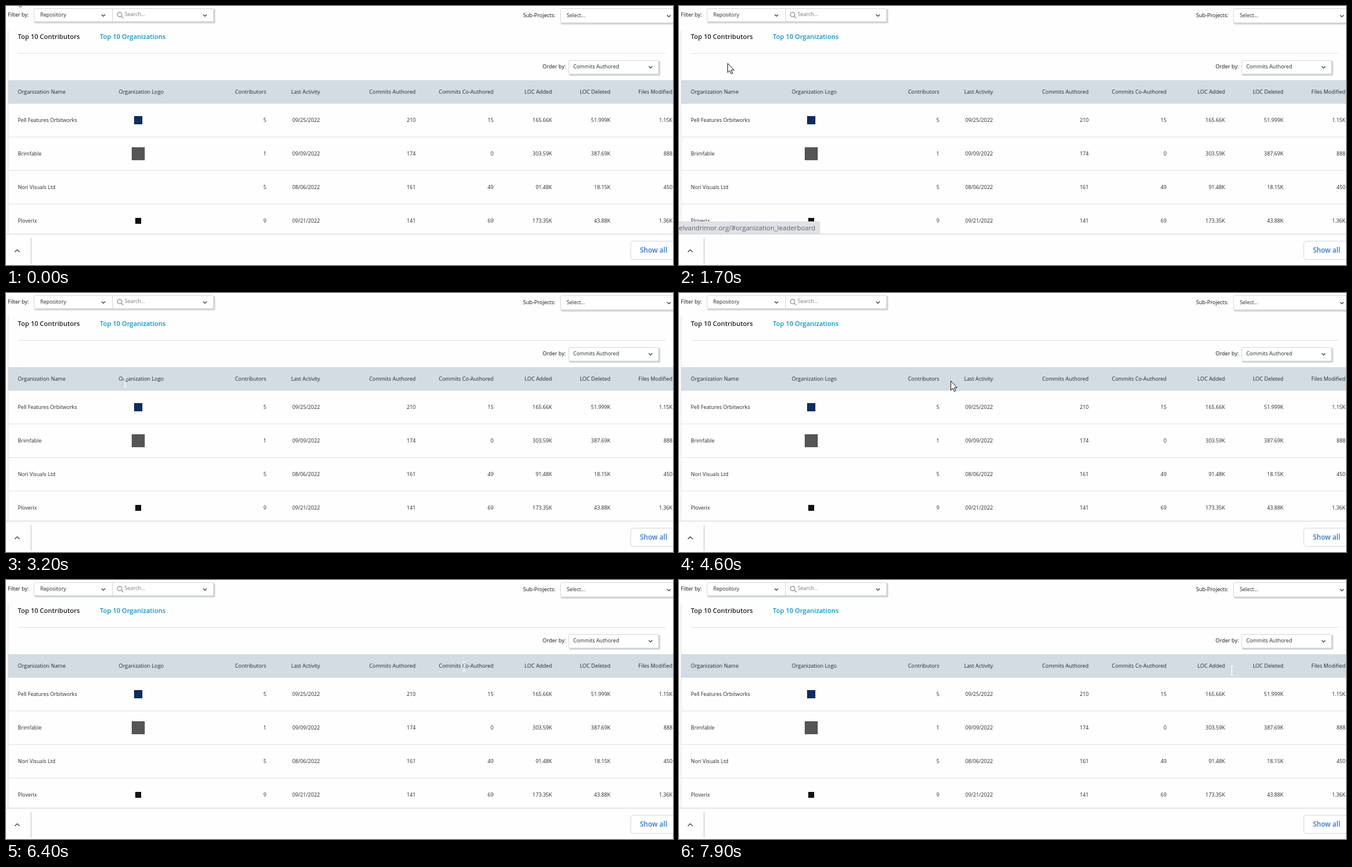
Animation of 1130 by 440 pixels, one loop 8000 ms. Source, as an HTML page:

```html
<!DOCTYPE html>
<html lang="en">
<head>
<meta charset="utf-8">
<title>Organization leaderboard</title>
<style>
html, body { margin: 0; width: 100%; height: 100%; overflow: hidden; background: #fefefe; }
svg { display: block; width: 100%; height: 100%; }
text { font: 8.8px "Open Sans", "Noto Sans", sans-serif; fill: #25282b; }
.label { font-size: 9px; fill: #111; }
.head { font-size: 8.95px; fill: #1d2a34; }
.tab { font-size: 11px; font-weight: 600; fill: #222; }
.active { fill: #0a94cb; }
.hint { fill: #777; }
.button { font-size: 11.6px; font-weight: 600; fill: #3273dc; }
.address { font-size: 11.25px; fill: #5c5f63; }
.chevron { fill: none; stroke: #333; stroke-width: 1.2; }
.box { fill: #fff; stroke: #d4d7da; }
.shadow { fill: #d2d5d8; }
</style>
</head>
<body>
<svg id="stage" viewBox="0 0 1130 440" xmlns="http://www.w3.org/2000/svg">
  <g id="page"></g>
  <g id="status">
    <rect y="366" width="239" height="21" fill="#dfe1e5"/>
    <text class="address" x="231" y="381" text-anchor="end">elvandrimor.org/#organization_leaderboard</text>
  </g>
  <path id="arrow" d="M.5 .5V16L4 12.7L6.4 18.3L8.8 17.3L6.5 11.8H11.3Z" fill="#fff" stroke="#111" stroke-linejoin="round"/>
  <path id="beam" d="M-3 -7.5H-.8L0 -6.8L.8 -7.5H3M0 -6.8V6.8M-3 7.5H-.8L0 6.8L.8 7.5H3" fill="none" stroke="#fff" stroke-width="1.2"/>
</svg>
<script>
const LOOP = 8000, STEP = 100;
const byId = id => document.getElementById(id);

const text = (x, y, str, cls = "", anchor = "start") =>
  `<text x="${x}" y="${y}" class="${cls}" text-anchor="${anchor}">${str}</text>`;
const rect = (x, y, w, h, fill) =>
  `<rect x="${x}" y="${y}" width="${w}" height="${h}" fill="${fill}"/>`;
const chevron = (x, y, size = 3, dir = 1) =>
  `<path class="chevron" d="M${x - size} ${y - dir * size / 2}l${size} ${dir * size}l${size} ${-dir * size}"/>`;
const select = (x, y, w, h) =>
  `<rect class="shadow" x="${x + 1}" y="${y + 1}" width="${w + 1.5}" height="${h + 1.5}" rx="2"/>
   <rect class="box" x="${x + .5}" y="${y + .5}" width="${w - 1}" height="${h - 1}" rx="2"/>`;

const columns = [
  ["Organization Name", 20, "start"],
  ["Organization Logo", 191, "start"],
  ["Contributors", 441, "end"],
  ["Last Activity", 483, "start"],
  ["Commits Authored", 694, "end"],
  ["Commits Co-Authored", 826, "end"],
  ["LOC Added", 925, "end"],
  ["LOC Deleted", 1024, "end"],
  ["Files Modified", 1129, "end"],
];
const rows = [
  ["Pell Features Orbitworks", "", "5", "09/25/2022", "210", "15", "165.66K", "51.999K", "1.15K"],
  ["Brimfable", "", "1", "09/09/2022", "174", "0", "303.59K", "387.69K", "888"],
  ["Nori Visuals Ltd", "", "5", "08/06/2022", "161", "49", "91.48K", "18.15K", "450"],
  ["Ploverix", "", "9", "09/21/2022", "141", "69", "173.35K", "43.88K", "1.36K"],
];
const badges = [[14, "#0d2d61"], [22, "#555"], null, [10, "#111"]];

function table() {
  let out = rect(3, 126, 1127, 40, "#d3dce3");
  for (const [title, x, anchor] of columns) out += text(x, 149, title, "head", anchor);
  rows.forEach((row, r) => {
    const y = 197 + r * 57;
    row.forEach((cell, c) => {
      const [, x, anchor] = columns[c];
      out += text(c === 3 ? x + 2 : x, y, cell, "", anchor);
    });
    if (badges[r]) {
      const [size, color] = badges[r];
      out += rect(224 - size / 2, y - 3 - size / 2, size, size, color);
    }
    if (r < 3) out += rect(4, y + 25, 1126, 1, "#e0e2e4");
  });
  return out;
}

byId("page").innerHTML =
  `<g id="heading">${text(22, -.5, "g", "label")}</g>` +
  text(3, 18, "Filter by:", "label") +
  select(47, 4, 305, 23) + rect(180, 4, 1, 23, "#d4d7da") +
  text(58, 18, "Repository") + chevron(165, 16) +
  `<g fill="none" stroke="#999" stroke-width="1.4"><circle cx="192.5" cy="14.5" r="3.8"/><path d="M195.3 17.3l3.4 3.4"/></g>` +
  text(201, 17, "Search...", "hint") + chevron(337, 16) +
  text(876, 19, "Sub-Projects:", "label") +
  select(939, 4, 200, 25) + text(950, 19, "Select...") + chevron(1123, 17) +
  rect(3, 40, 1, 347, "#e0e2e4") +
  text(20, 56, "Top 10 Contributors", "tab") +
  text(159, 56, "Top 10 Organizations", "tab active") +
  rect(20, 80, 1097, 1, "#dcdee0") +
  text(909, 106, "Order by:", "label") +
  select(953, 92, 153, 24) + text(961, 106, "Commits Authored") + chevron(1092, 104) +
  table() +
  rect(0, 387, 1130, 53, "#fefefe") + rect(0, 387, 1130, 1, "#d0d2d4") +
  rect(42, 394, 1, 44, "#bfc1c3") + chevron(19, 416, 4, -1) +
  `<rect class="box" x="1058.5" y="399.5" width="90" height="31" rx="4"/>` +
  text(1074, 419, "Show all", "button");

// Pointer stops: arrival, departure, x, y, text cursor
const stops = [
  [500, 700, 196, 54], [1300, 1400, 215, 52], [1700, 1700, 82, 97],
  [2300, 2300, 32, 141], [2600, 2700, 99, 161], [3200, 3200, 202, 152, true],
  [3600, 3600, 250, 149, true], [3900, 4000, 368, 146], [4600, 4600, 460, 149],
  [4700, 4800, 476, 149], [5000, 5100, 518, 155], [5400, 5500, 589, 151],
  [5600, 5600, 613, 149], [6200, 6300, 751, 144, true], [6800, 6900, 875, 161],
  [7100, 7100, 910, 148], [7400, 7400, 1078, 150], [7700, LOOP, 936.5, 154, true],
];

function pointerAt(t) {
  const i = stops.findLastIndex(stop => stop[0] <= t);
  if (i < 0) return null;
  const [, leave, x, y, beam] = stops[i];
  const next = stops[i + 1];
  if (!next || t <= leave) return { x, y, beam };
  const k = (t - leave) / (next[0] - leave);
  return { x: Math.round(x + (next[2] - x) * k), y: Math.round(y + (next[3] - y) * k), beam };
}

function statusOpacity(t) {
  if (t < 500 || t >= 1900) return 0;
  return t < 600 || t >= 1800 ? .5 : 1;
}

function show(id, visible) {
  byId(id).setAttribute("visibility", visible ? "visible" : "hidden");
}

function draw(now) {
  const t = Math.floor(now % LOOP / STEP) * STEP;
  const pointer = pointerAt(t);
  show("heading", t < 200);
  byId("status").setAttribute("opacity", statusOpacity(t));
  show("arrow", pointer && !pointer.beam);
  show("beam", pointer && pointer.beam);
  if (pointer) {
    const shape = byId(pointer.beam ? "beam" : "arrow");
    shape.setAttribute("transform", `translate(${pointer.x} ${pointer.y})`);
  }
  requestAnimationFrame(draw);
}
requestAnimationFrame(draw);
</script>
</body>
</html>
```
